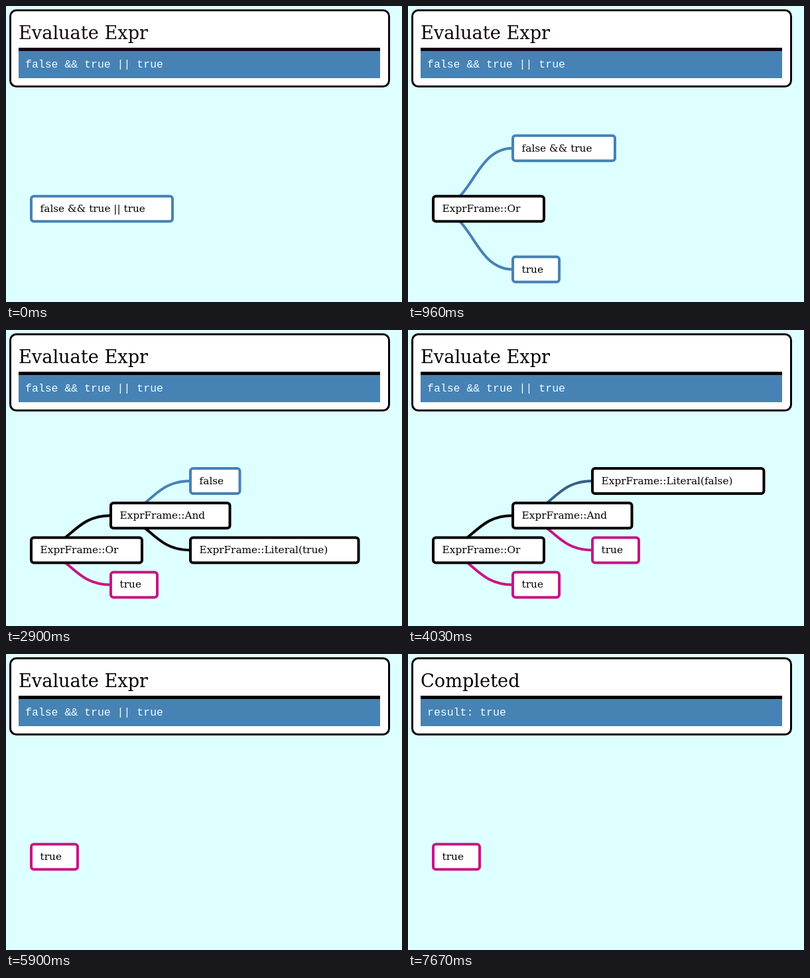
An HTML page that plays this animation: 597x447 px, repeating every 8000 ms.

```html
<!DOCTYPE html>
<html lang="en">
<head>
<meta charset="utf-8">
<title>Expression evaluation</title>
<style>
  html, body { margin: 0; width: 100%; height: 100%; overflow: hidden; background: #deffff; }
  svg { display: block; }
  text { font: 15.3px "DejaVu Serif", serif; white-space: pre; }
  #title { font-size: 27.2px; }
  #code { font: 16.5px "Liberation Mono", monospace; fill: azure; }
  #links { fill: none; stroke-width: 4; }
  #nodes rect { fill: #fff; stroke-width: 4; }
</style>
</head>
<body>
<svg width="597" height="447">
  <rect id="frame" x="6.5" y="6.5" width="571" height="115" rx="9" fill="#fff" stroke-width="3"/>
  <text id="title" x="19" y="50"></text>
  <rect id="rule" x="19" y="63" width="545" height="5"/>
  <rect x="19" y="68" width="545" height="41" fill="#4682b4"/>
  <text id="code" x="29" y="93"></text>
  <g id="links"></g>
  <g id="nodes"></g>
</svg>
<script>
const LOOP = 8000, MOVE = 250;
const BLUE = [70, 130, 180], BLACK = [0, 0, 0], VIOLET = [199, 21, 133];
const $ = id => document.getElementById(id);

const boxWidth = {
  'true': 70, 'false': 74.5, 'false && true': 154, 'false && true || true': 213,
  'ExprFrame::Or': 167, 'ExprFrame::And': 179.5,
  'ExprFrame::Literal(true)': 253.5, 'ExprFrame::Literal(false)': 258.5
};

// y holds one value per tree depth; a node not yet open sits on its parent
const tree = [
  { label: 'false && true || true', depth: 0, y: [306.3, 306.3, 332.4] },
  { label: 'false && true', depth: 1, parent: 0, y: [306.3, 214.8, 280.2] },
  { label: 'true', depth: 1, parent: 0, y: [306.3, 397.8, 384.7] },
  { label: 'false', depth: 2, parent: 1, y: [306.3, 214.8, 227.9] },
  { label: 'true', depth: 2, parent: 1, y: [306.3, 214.8, 332.4] }
];

// time, node, new label, new colour, tree depth
const steps = [
  [477, 0, 'ExprFrame::Or', BLACK, 1],
  [1037, 2, 'ExprFrame::Literal(true)', BLACK, 1],
  [1600, 2, 'true', VIOLET, 1],
  [2177, 1, 'ExprFrame::And', BLACK, 2],
  [2710, 4, 'ExprFrame::Literal(true)', BLACK, 2],
  [3307, 4, 'true', VIOLET, 2],
  [3930, 3, 'ExprFrame::Literal(false)', BLACK, 2],
  [4510, 3, 'false', VIOLET, 2],
  [5087, 1, 'false', VIOLET, 1],
  [5647, 0, 'true', VIOLET, 0]
];

const clamp = v => Math.min(1, Math.max(0, v));
const lerp = (a, b, p) => a + (b - a) * p;
const mix = (a, b, p) => `rgb(${a.map((v, i) => Math.round(lerp(v, b[i], p)))})`;
const escapeText = s => s.replace(/&/g, '&amp;');
const cubicInOut = u => u < .5 ? 4 * u ** 3 : 1 - 4 * (1 - u) ** 3;

// cubic-bezier(.25, .1, .25, 1)
function cssEase(x) {
  if (x <= 0 || x >= 1) return clamp(x);
  const curve = (a, b, s) => 3 * a * s * (1 - s) ** 2 + 3 * b * s * s * (1 - s) + s ** 3;
  let lo = 0, hi = 1;
  for (let i = 0; i < 20; i++) {
    const mid = (lo + hi) / 2;
    if (curve(.25, .25, mid) < x) lo = mid; else hi = mid;
  }
  return curve(.1, 1, lo);
}

const flash = t => cssEase(t / 400) - cssEase((t - 505) / 800);

function drawHeader(t) {
  const done = t >= 6320;
  const color = mix(BLACK, VIOLET, flash(t + 45) + flash(t - 6365));
  $('title').textContent = done ? 'Completed' : 'Evaluate Expr';
  $('code').textContent = done ? 'result: true' : 'false && true || true';
  $('frame').setAttribute('stroke', color);
  $('title').setAttribute('fill', color);
  $('rule').setAttribute('fill', color);
}

function drawTree(t) {
  const nodes = tree.map(n => ({ ...n, from: BLUE, color: BLUE }));
  let start = -MOVE, before = 0, now = 0;
  for (const [time, id, label, color, depth] of steps) {
    if (time > t) break;
    nodes.forEach(n => n.from = n.color);
    Object.assign(nodes[id], { label, color });
    [start, before, now] = [time, now, depth];
  }
  const p = cubicInOut(clamp((t - start) / MOVE));
  const open = p < 1 ? Math.max(before, now) : now;
  const column = (n, depth) => 38 + 120 * Math.min(n.depth, depth);
  let links = '', boxes = '';
  for (const n of nodes) {
    n.px = lerp(column(n, before), column(n, now), p);
    n.py = lerp(n.y[before], n.y[now], p);
    if (n.depth > open) continue;
    if (n.depth) {
      const { px, py } = nodes[n.parent], mid = (px + n.px) / 2;
      links += `<path d="M${px},${py}C${mid},${py} ${mid},${n.py} ${n.px},${n.py}" stroke="${mix(n.from, n.color, p)}"/>`;
    }
    boxes += `<g transform="translate(${n.px},${n.py})">
      <rect y="-19" width="${boxWidth[n.label]}" height="38" rx="4" stroke="rgb(${n.color})"/>
      <text x="13.6" y="4.7">${escapeText(n.label)}</text></g>`;
  }
  $('links').innerHTML = links;
  $('nodes').innerHTML = boxes;
}

const origin = performance.now();
function draw() {
  const t = (performance.now() - origin) % LOOP;
  drawHeader(t);
  drawTree(t);
  requestAnimationFrame(draw);
}
draw();
</script>
</body>
</html>
```
